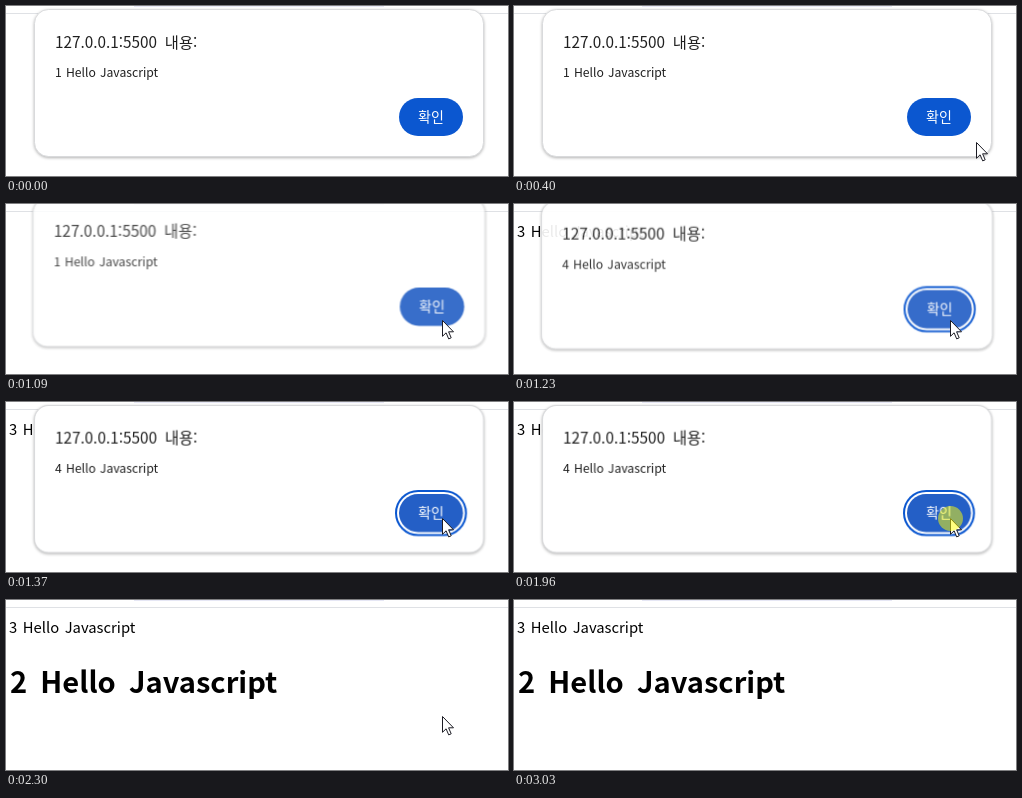
Write an HTML page that moves like this. It is 502 by 170 pixels and loops after 3.76 s.

```html
<!DOCTYPE html>
<html lang="ko">
<head>
<meta charset="utf-8">
<title>Alert and page output</title>
<style>
  html, body { margin: 0; width: 100%; height: 100%; overflow: hidden; background: #fff; }
  svg { display: block; width: 502px; height: 170px; }
  text { font-family: "Noto Sans CJK KR", "Noto Sans CJK", "Open Sans", sans-serif; font-weight: 350; fill: #000; white-space: pre; }

  .title { font-size: 15.3px; word-spacing: 3.6px; fill: #1f1f1f; }
  .message { font-size: 12.2px; word-spacing: .7px; fill: #1f1f1f; }
  .label { font-size: 14px; fill: #fff; text-anchor: middle; }
  .line { font-size: 14.8px; word-spacing: 1.4px; }
  .heading { font-size: 29.1px; font-weight: 700; word-spacing: 5px; }

  .panel { fill: #fff; stroke: #d9dadc; filter: drop-shadow(0 1px 1.5px rgba(0, 0, 0, .3)); }
  .ring { fill: #fff; stroke: #0b57d0; stroke-width: 2; }
  .tap { fill: rgba(255, 255, 0, .5); }

  /* Every part steps through one shared 3.76 s loop. */
  .play { animation: 3.76s step-end infinite; }
  .dialog { animation-name: dialog; transform-origin: 253px 77px; }
  .first { animation-name: first; }
  .second { animation-name: second; }
  .button { animation-name: button; }
  .ring { animation-name: ring; }
  .line { animation-name: line; }
  .heading { animation-name: heading; }
  .pointer { animation-name: pointer; }
  .tap { animation-name: tap; }

  @keyframes dialog {
    0% { opacity: 1; transform: none; }
    28.98% { opacity: .82; transform: translateY(-8.6px) scale(1.006); }
    30.85% { opacity: .5; transform: translateY(-12px) scale(1.008); }
    32.71% { opacity: .92; transform: translateY(-6px) scale(1.004); }
    34.57% { opacity: .98; transform: translateY(-2px) scale(1.001); }
    36.43% { opacity: 1; transform: none; }
    55.85% { opacity: .95; transform: translateY(-4px) scale(1.003); }
    57.44% { opacity: .81; transform: translateY(-8.6px) scale(1.006); }
    59.3% { opacity: .3; transform: translateY(-13px) scale(1.009); }
    61.16%, 100% { opacity: 0; transform: translateY(-15px) scale(1.01); }
  }
  @keyframes first {
    0% { opacity: 1; }
    30.85%, 100% { opacity: 0; }
  }
  @keyframes second {
    0% { opacity: 0; }
    30.85%, 100% { opacity: 1; }
  }
  @keyframes button {
    0% { fill: #0b57d0; }
    14.36% { fill: #175ed4; }
    16.22% { fill: #2365d8; }
    25.26% { fill: #245cc0; }
    28.98% { fill: #0d4fbf; }
    30.85% { fill: #245fc6; }
    55.85%, 100% { fill: #0d4fbf; }
  }
  @keyframes ring {
    0% { opacity: 0; }
    30.85% { opacity: 1; }
    55.85%, 100% { opacity: 0; }
  }
  @keyframes line {
    0% { opacity: 0; }
    30.85%, 100% { opacity: 1; }
  }
  @keyframes heading {
    0% { opacity: 0; }
    55.85%, 100% { opacity: 1; }
  }
  @keyframes pointer {
    0% { opacity: 0; transform: translate(480px, 163px); }
    6.91% { opacity: 1; transform: translate(480px, 163px); }
    8.77% { opacity: 1; transform: translate(474px, 150px); }
    10.63% { opacity: 1; transform: translate(462px, 136px); }
    12.49% { opacity: 1; transform: translate(450px, 126px); }
    14.36% { opacity: 1; transform: translate(442px, 119px); }
    16.22% { opacity: 1; transform: translate(437px, 117px); }
    18.08% { opacity: 1; transform: translate(436px, 116px); }
    78.72% { opacity: .5; transform: translate(436px, 116px); }
    80.58%, 100% { opacity: 0; transform: translate(436px, 116px); }
  }
  @keyframes tap {
    0% { opacity: 0; }
    25.26% { opacity: 1; }
    28.98% { opacity: 0; }
    52.12% { opacity: 1; }
    55.85%, 100% { opacity: 0; }
  }
</style>
</head>
<body>
<svg viewBox="0 0 502 170">
  <path d="M128 .5H378" stroke="#e6e7f5"/>
  <path d="M0 7.5H502" stroke="#dfe1e5"/>
  <text class="play line" x="3" y="33">3 Hello Javascript</text>
  <text class="play heading" x="4" y="93">2 Hello Javascript</text>

  <g class="play dialog">
    <rect class="panel" x="28.5" y="3.5" width="449" height="147" rx="14"/>
    <text class="title" x="49" y="42">127.0.0.1:5500 내용:</text>
    <text class="play message first" x="49" y="71">1 Hello Javascript</text>
    <text class="play message second" x="49" y="71">4 Hello Javascript</text>
    <rect class="play ring" x="390" y="89" width="70" height="44" rx="22"/>
    <rect class="play button" x="393" y="92" width="64" height="38" rx="19"/>
    <text class="label" x="425" y="116">확인</text>
  </g>

  <path class="play pointer" d="M.5 .5V16.3L4.1 12.8L6.7 18.9L9.2 17.8L6.6 11.8H11.5Z" fill="#fff" stroke="#1c1c24"/>
  <circle class="play tap" cx="436.5" cy="116.5" r="12.5"/>
</svg>
</body>
</html>
```
